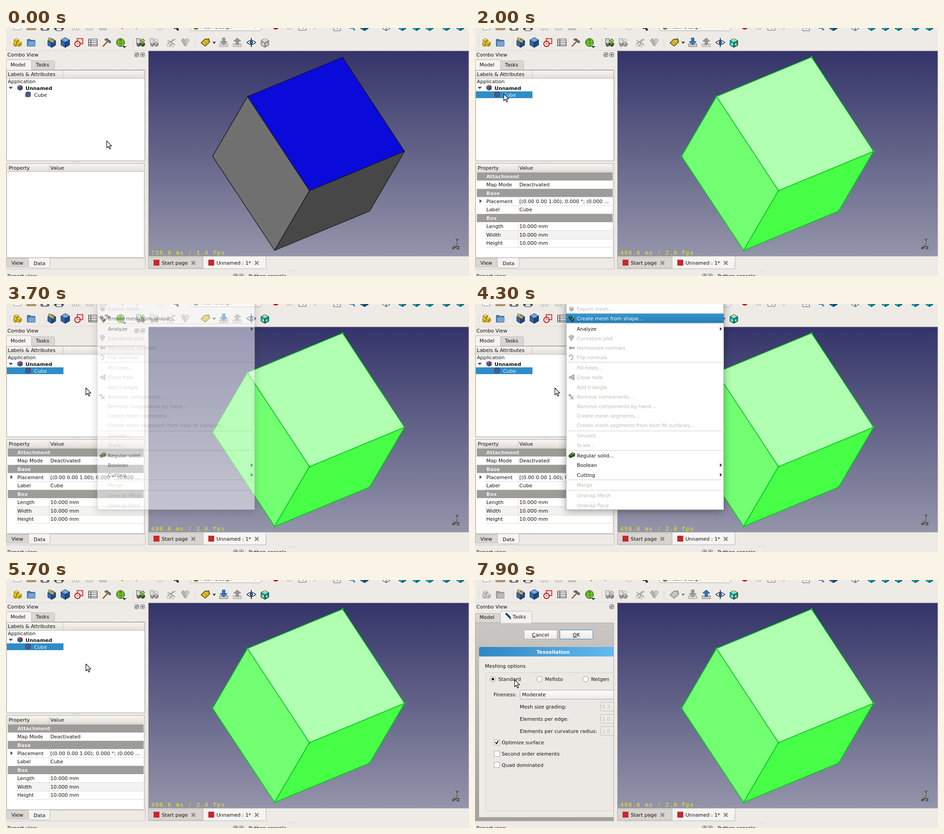
These frames come from a looping animation (1023 px wide and 548 px high, 8 s). An HTML page:

```html
<!DOCTYPE html>
<html lang="en">
<head>
<meta charset="utf-8">
<title>Meshing a cube</title>
<style>
html, body { margin: 0; width: 100%; height: 100%; overflow: hidden; background: #eeebe7; }
svg { display: block; width: 100%; height: 100%; }
text { font: 11px "DejaVu Sans", sans-serif; fill: #111; white-space: pre; }
.b { font-weight: bold; }
.w { fill: #fff; }
.dis { fill: #bdbab7; }
.u { text-decoration: underline; }
.fps { font: 12px "Liberation Mono", monospace; letter-spacing: 1.88px; fill: #f2f200; }
.off { filter: grayscale(1) opacity(.65); }
</style>
</head>
<body>
<svg id="stage" viewBox="0 0 1023 548" preserveAspectRatio="none"></svg>
<script>
const stage = document.getElementById('stage');

// Drawing helpers
const text = (x, y, s, cls = '') => `<text x="${x}" y="${y}" class="${cls}">${s}</text>`;
const rect = (x, y, w, h, fill, stroke = 'none', r = 0) =>
  `<rect x="${x}" y="${y}" width="${w}" height="${h}" rx="${r}" fill="${fill}" stroke="${stroke}"/>`;
const path = (d, fill = 'none', stroke = 'none', w = 1) =>
  `<path d="${d}" fill="${fill}" stroke="${stroke}" stroke-width="${w}" stroke-linejoin="round"/>`;
const disc = (x, y, r, fill, stroke = 'none') =>
  `<circle cx="${x}" cy="${y}" r="${r}" fill="${fill}" stroke="${stroke}"/>`;
const group = (id, body, attrs = '') => `<g id="${id}" ${attrs}>${body}</g>`;
const at = (x, y, body) => `<g transform="translate(${x} ${y})">${body}</g>`;
const gradient = (id, from, to, dir = 'x2="0" y2="1"') =>
  `<linearGradient id="${id}" ${dir}><stop stop-color="${from}"/><stop offset="1" stop-color="${to}"/></linearGradient>`;
const cube = (x, y, r, top, left, right, line = '#222') => {
  const a = r * .87, h = r / 2;
  return at(x, y,
    path(`M0 ${-r}L${a} ${-h}L0 0L${-a} ${-h}Z`, top, line) +
    path(`M${-a} ${-h}L0 0V${r}L${-a} ${h}Z`, left, line) +
    path(`M${a} ${-h}L0 0V${r}L${a} ${h}Z`, right, line));
};
const dots = (x, y, dx, dy, n) => Array.from({ length: n }, (_, i) =>
  rect(x + dx * i, y + dy * i, 1, 1, '#aaa6a2')).join('');
const cross = (x, y, r, c, w) => path(`M${x - r} ${y - r}l${2 * r} ${2 * r}m0 ${-2 * r}l${-2 * r} ${2 * r}`, 'none', c, w);
const floatBtn = (x, y) => rect(x - 4.5, y - 4.5, 9, 9, '#f4f2f0', '#555', 2) +
  rect(x - 2.5, y - .5, 3, 3, 'none', '#444') + path(`M${x - 1} ${y - 2.5}h3.5v3.5`, 'none', '#444');
const closeBtn = (x, y) => rect(x - 4.5, y - 4.5, 9, 9, '#f4f2f0', '#555', 2) + cross(x, y, 2, '#333', 1.4);

const green = ['#8bd83a', '#4f9c14', '#2f700b'];
const gray = ['#ddd', '#aaa', '#888'];
const blue = ['#7aa7dc', '#2f68ac', '#1d4a85'];
const teal = ['#5ee0e6', '#17b3bd', '#0b8791'];
const yellow = ['#ffe65c', '#e5c218', '#c29d0a', '#94780a'];

function topRow() {
  const sheet = (x, h) => rect(x - 8, -9, 16, h, '#fafafa', '#888');
  const views = [840, 876, 907, 936, 973, 1004].map((x, i) =>
    cube(x, -3, 9, ...(i ? teal : ['#eee', '#eee', '#ddd']), '#073f48')).join('');
  return sheet(25, 13) +
    rect(46, -8, 20, 12, '#b99a6b', '#7d6540', 1) +
    rect(77, -8, 18, 13, '#777', '#333', 2) + rect(82, 0, 8, 4, '#eee') +
    rect(107, -6, 20, 10, '#555', '#222', 2) + rect(111, 0, 12, 6, '#eee', '#333') +
    disc(149, 2, 3, 'none', '#999') + disc(158, 2, 3, 'none', '#999') +
    rect(178, -8, 13, 12, '#ddd', '#aaa') + rect(207, -8, 15, 12, '#ccc', '#999') +
    path('M253 -2l4 5 5-6', '#e3c52c', '#b5951c') + path('M283 -4l5 7 4-6', '#ccc', '#aaa') +
    disc(340, -3, 8, '#e4e1de', '#bbb') +
    path('M370 -6l2 8 3-2 4 6 3-2-4-6 4-1z', '#335', '#111') +
    rect(407.5, -12, 157, 18, '#f8f6f4', '#aaa6a2', 3) +
    disc(420, -3, 6, '#4f9c14', '#214f08') + text(429, 1, 'Mesh Design') + path('M547 -3h8l-4 4z', '#333') +
    disc(596, -4, 7, '#d92318', '#8f1109') + rect(621, -7, 10, 10, '#ddd', '#c5c2bf') +
    rect(647, -8, 16, 13, '#f8f8f8', '#555') + path('M655 2l7-9', 'none', '#d87c18', 2) +
    path('M681 -8v12l8-7z', '#ddd', '#bbb') +
    rect(724, -8, 15, 14, '#e8eef4', '#555') + path('M728 -3l4 5 4-5', '#3375b7') +
    disc(762, -5, 6, '#bfe6ef', '#236') + path('M765 -1l6 6', 'none', '#287fae', 3) +
    cube(792, -4, 10, '#e44', '#17a', '#058', '#123') + views;
}

function toolRow() {
  const icon = (id, x, body) => group(id, at(x, 32, body));
  const sheets = (c) => rect(-9.5, -8.5, 8, 10, '#f4f4f4', '#444') + path('M-8 -5.5h5m-5 3h5', 'none', '#888') +
    path('M0 -6h4v-3l5 5-5 5v-3h-4z', c[0], c[2]) + cube(-5, 5, 4, ...gray) + cube(4, 4, 5, ...c);
  const tray = (d) => path('M-9 3v6h18v-6h-4v2h-10v-2z', '#ddd', '#555') + path(d, '#2d78c4', '#16406e');
  return dots(8, 25, 0, 3, 6) + dots(84, 25, 0, 3, 6) + dots(280, 25, 0, 3, 6) + dots(417, 25, 0, 3, 6) +
    icon('part', 25, cube(-2, -3, 6, ...yellow) + cube(-4, 4, 5, ...yellow) + cube(4, 3, 6, ...yellow)) +
    icon('folder', 56, path('M-9 -7h6l2 2h9v13h-17z', '#4678ad', '#2e547d') + rect(-7.5, -3, 16, 11, '#79a6d6', '#4573a5', 1)) +
    at(101, 32, cube(0, 1, 10, ...blue, '#0e2a50') + path('M-8 -8l10 9 3 1-1-4-9-9z', '#f0c52a', '#4a3907')) +
    at(131, 32, cube(0, 0, 11, ...blue, '#0e2a50')) +
    at(161, 32, rect(-4, -9, 13, 12, 'none', '#c81414') + rect(-3, -8, 11, 10, 'none', '#c81414') +
      `<circle cx="-3" cy="3" r="6" fill="#eeebe7" fill-opacity=".5" stroke="#c81414" stroke-width="2"/>`) +
    at(192, 32, rect(-9.5, -7.5, 19, 15, '#fff', '#222') + path('M-9 -3.5h18m-18 4h18m-18 4h18M-4.5 -7v15', 'none', '#222')) +
    at(222, 32, path('M-8 9L4 -4', 'none', '#9c6a2c', 3) + path('M-4 -7l5-2 8 6v4l-4-1-3-4-5-1z', '#777', '#333')) +
    at(253, 32, disc(0, 0, 9, '#4f9c14', '#214f08') + path('M-8 -3q8 4 16 0M-8 3q8 4 16 0M-3 -8q-3 8 0 16M4 -8q3 8 0 16', 'none', '#a5e35a') +
      path('M4 8h9l-4.5 4z', '#222')) +
    icon('import', 298, sheets(green)) +
    at(328, 32, `<g class="off">${sheets(gray)}</g>`) +
    at(365, 32, `<g class="off">${path('M-8 2l17-9M-8 -5l17 10M-2 9l6-17', 'none', '#777', 2)}${disc(-6, 6, 3, 'none', '#777')}${disc(3, 7, 3, 'none', '#777')}</g>`) +
    at(396, 32, `<g class="off">${path('M-9 -5l6-4 2 4v13z', '#999', '#555')}${path('M9 -5l-6-4-2 4v13z', '#bbb', '#555')}</g>`) +
    icon('tag', 440, path('M-9 1l8-8 9-1 2 7-10 9z', '#eac61c', '#3f3404', 1.5) + path('M-4 1l5-4m-2 7l5-4', 'none', '#6c5806') + disc(6, -4, 1.8, '#fff', '#6c5806')) +
    group('tagArrow', path('M456 30.5h8l-4 4.5z', '#333')) +
    icon('load', 481, tray('M-3 -10h6v8h5l-8 7-8-7h5z')) +
    icon('store', 511, tray('M-3 4h6v-7h5l-8-7-8 7h5z')) +
    at(542, 32, path('M-10 0q10-9 20 0q-10 9-20 0z', '#fff', '#16325c', 1.5) + path('M0 -10l2 10-2 10-2-10z', '#2478bd', '#16325c') + disc(0, 0, 3, '#2478bd', '#111')) +
    icon('box', 572, cube(0, 1, 10, ...teal, '#06434a') + disc(-4, 4, 2.2, '#e9e33a') + disc(4, 4, 2.2, '#e9e33a') + disc(0, -6, 2.5, '#e9e33a'));
}

function solid() {
  const P = { a: [743, 64], b: [880, 272], c: [670, 359], d: [533, 151], e: [456, 283], f: [593, 491], g: [803, 404] };
  const faces = (cols, line, w) => ['abcd', 'dcfe', 'cbgf'].map((f, i) =>
    path('M' + [...f].map(k => P[k].join(' ')).join('L') + 'Z', cols[i], line, w)).join('');
  const ends = Object.values(P).map(([x, y]) => rect(x - 2, y - 2, 4, 4, '#00cc1c')).join('');
  return at(.5, .5, group('plain', faces(['#0a0adb', '#707070', '#474747'], '#111', 1.3)) +
    group('picked', faces(['#b1ffb1', '#72ff72', '#47ff47'], '#00c41c', 1.5) + ends));
}

function view3d() {
  return rect(314, 50, 709, 455, '#c6c2be') + rect(315, 51, 707, 453, 'url(#sky)') + solid() +
    group('fps', text(321, 501, '', 'fps')) +
    path('M995 483l2-9', 'none', '#152', 1) + path('M994 486l-5 -8 6 6', 'none', '#1a8a2a') + path('M986 487l10-4', 'none', '#b01818', 1.5) +
    path('M994 465l2.5 4v3m0-3l3-4M986 483l6 6m0-6l-6 6M996 483h6l-6 5h6', 'none', '#111') +
    path('M314.5 505v27h260v-27', '#f6f4f2', '#b5b1ad') + rect(314.5, 506, 121, 25, '#d8d4d0', '#b5b1ad') +
    rect(326, 512, 13, 13, '#c8272d') + text(344, 523, 'Start page') + cross(414, 519, 4, '#8b8885', 2.5) +
    rect(447, 512, 13, 13, '#c8272d') + text(465, 523, 'Unnamed : 1*') + cross(554, 519, 4, '#8b8885', 2.5) +
    dots(625, 536, 3, 0, 6) + dots(312, 286, 0, 3, 5) +
    text(3, 552, 'Report view') + floatBtn(507, 548) + closeBtn(520, 548) + text(536, 552, 'Python console');
}

function modelPanel() {
  const row = (y, k, v, alt) => (alt ? rect(22, y - 9, 282, 18, '#f5f3f1') : '') + text(25, y + 4, k) + text(98, y + 4, v) +
    path(`M22 ${y + 9.5}h282M95.5 ${y - 9}v18`, 'none', '#dedad6');
  const head = (y, s) => rect(4, y - 9, 300, 18, '#9e9c99') + text(25, y + 4, s, 'b').replace('<text', '<text style="fill:#eee"');
  const props = head(328, 'Attachment') + row(346, 'Map Mode', 'Deactivated') + head(364.5, 'Base') +
    row(383, 'Placement', '[(0.00 0.00 1.00); 0.000 °; (0.000 ...') + path('M10 378.5l5 4-5 4z', '#444') +
    row(401, 'Label', 'Cube') + head(420, 'Box') + row(438, 'Length', '10.000 mm') +
    row(457, 'Width', '10.000 mm', 1) + row(475, 'Height', '10.000 mm');
  return closeBtn(302, 59) + floatBtn(289, 59) +
    path('M56.5 92.5v-20h48q3 0 3 3v17z', '#dad6d2', '#b8b4b0') + path('M.5 93v-19q0-4 4-4h48q4 0 4 4v18.5h251', '#f6f4f2', '#b8b4b0') +
    text(10, 85, 'Model') + text(66, 85, 'Tasks') +
    rect(1.5, 93.5, 305, 200, '#fff', '#a5a19d') + rect(2, 94, 304, 17, 'url(#head)') + path('M2 111.5h304M126.5 94v17', 'none', '#c5c1bd') +
    text(4, 106, 'Labels &amp; Attributes') + text(4, 122, 'Application') +
    path('M6 130h9l-4.5 5z', '#444') + cube(31, 132, 6, ...blue, '#34507a') + disc(33, 130, 3, '#c8272d') + text(43, 137, 'Unnamed', 'b') +
    group('rowSel', rect(2, 140, 125, 15, '#308cc6')) +
    at(48, 147, path('M-4 -5l5-1 5 1v9l-5 1.5-5-1.5z', '#34649c', '#253b60') + path('M-5 5V-3M-6 4l5 1M1 -4v9', 'none', '#b52d35')) +
    group('cubeName', text(62, 152, 'Cube')) +
    dots(147, 295, 3, 0, 6) +
    rect(1.5, 299.5, 304, 208, '#fff', '#a5a19d') + rect(3, 301, 301, 16, 'url(#head)') + path('M3 317.5h301M95.5 301v16', 'none', '#c5c1bd') +
    text(6, 313, 'Property') + text(98, 313, 'Value') + group('props', props) +
    rect(.5, 509, 49, 19, '#dad6d2', '#b8b4b0', 2) + path('M49.5 508v18q0 4 4 4h40q4 0 4-4v-18', '#f6f4f2', '#b8b4b0') +
    text(12, 523, 'View') + text(61, 524, 'Data') + path('M98 508.5h209.5v24H0', 'none', '#cbc7c3');
}

function taskPanel() {
  const key = (s) => `<tspan class="u">${s[0]}</tspan>${s.slice(1)}`;
  const button = (x, w, tx, s, line) => rect(x + .5, 110.5, w, 20, 'url(#btn)', line, 2) + text(tx, 125, key(s));
  const radio = (x, s) => disc(x, 219, 6, '#fff', '#8e8a86') + text(x + 12, 223, s);
  const spin = (y, s, v) => text(99, y + 4, s) + rect(277.5, y - 9.5, 40, 19, '#eeebe7', '#bbb7b3', 2) + text(281, y + 4, v, 'dis');
  const check = (y, s) => rect(42.5, y - 6, 12, 12, '#fff', '#aaa6a2') + text(59, y + 4, s);
  return rect(0, 50, 309, 483, '#eeebe7') + text(3, 63, 'Combo View') + floatBtn(302, 59) +
    path('M.5 94v-20h52q3 0 3 3v17z', '#dad6d2', '#b8b4b0') +
    rect(.5, 94.5, 306, 438, 'url(#task)', '#b5b1ad') +
    path('M56 96v-23q0-4 4-4h62q4 0 4 4v23z', '#f4f2f0', '#b8b4b0') + rect(56.5, 94, 69, 2, '#e6e3e0') +
    text(10, 86, 'Model') + path('M67 75l8 8 4 4-1-6-8-8z', '#28477d', '#14284d') + text(83, 85, 'Tasks') +
    `<g clip-path="url(#dock)">` +
    button(108, 73, 126, 'Cancel', '#aaa6a2') + button(187, 73, 216, 'OK', '#3c83ad') +
    rect(9, 169, 297, 355, '#eeebe7') + path('M9 169v-18q0-3 3-3h294v21z', 'url(#bar)') + text(136, 163, 'Tessellation', 'b w') +
    text(22, 194, 'Meshing options') + rect(23.5, 204.5, 300, 306, '#ece9e5', '#d6d2ce', 2) +
    radio(39.5, 'Standard') + radio(142.5, 'Mefisto') + radio(244.5, 'Netgen') + `<circle id="mark" cy="219" r="3" fill="#222"/>` +
    text(41, 257, 'Fineness:') + rect(99.5, 243.5, 230, 20, 'url(#btn)', '#aaa6a2', 2) + text(104, 257, 'Moderate') +
    spin(280, 'Mesh size grading:', '0.3') + spin(307, 'Elements per edge:', '1.0') + spin(333.5, 'Elements per curvature radius:', '2.0') +
    check(359, 'Optimize surface') + path('M45 358l2.5 4 4-7', 'none', '#111', 2) +
    check(384, 'Second order elements') + check(408.5, 'Quad dominated') + '</g>';
}

// Rows: centre y, label, flags (x = disabled, s = submenu), shortcut
function menu(id, x, w, h, seps, rows, extra) {
  const body = rows.map(([y, s, flags = '', keys = '']) => {
    const cls = flags.includes('x') ? 'dis' : '';
    return text(x + 24, y + 4, s, cls) + (keys ? text(x + 205, y + 4, keys, cls) : '') +
      (flags.includes('s') ? path(`M${x + w - 9} ${y - 4}l5 4-5 4z`, '#444') : '');
  }).join('');
  const lines = seps.map(y => path(`M${x + 4} ${y + .5}h${w - 8}`, 'none', '#cfccc9')).join('');
  return group(id, `<rect x="${x}" y="-20" width="${w}" height="${h + 23}" opacity=".35" filter="url(#soft)"/>` +
    rect(x + .5, -5.5, w - 1, h + 5, '#fff', '#a9a6a3') + lines + extra + body);
}

function menus() {
  const macro = menu('macro', 154, 267, 171, [42], [
    [10.5, 'Stop macro recording', 'x'], [32, 'Macros ...'], [55, 'Execute macro', 'x', 'Ctrl+F6'],
    [76, 'Debug macro', 'x', 'F6'], [97, 'Stop debugging', 'x', 'Shift+F6'], [118, 'Step over', 'x', 'F10'],
    [139.5, 'Step into', 'x', 'F11'], [160.5, 'Toggle breakpoint', 'x', 'F9']
  ], rect(162.5, 7.5, 7, 7, '#eee', '#bbb') + rect(160.5, 27, 12, 12, '#fff', '#555') + path('M164 36l9-10', 'none', '#df7e1b', 2.5) +
    path('M162.5 50v9l7-4.5z', '#eee', '#bbb') + path('M160 70h5l8 6-8 6h-5z', '#aaa') + rect(159.5, 90.5, 14, 13, '#aaa', '#888'));
  const dim = '#a9a7a5';
  const mesh = menu('mesh', 201, 349, 455, [43, 128, 280, 323, 388, 411], [
    [10.5, 'Export mesh...', 'x'], [55, 'Analyze', 's'], [76, 'Curvature plot', 'x'], [97, 'Harmonize normals', 'x'],
    [118, 'Flip normals', 'x'], [141, 'Fill holes...', 'x'], [162, 'Close hole', 'x'], [183.5, 'Add triangle', 'x'],
    [204.5, 'Remove components...', 'x'], [226, 'Remove components by hand...', 'x'], [247, 'Create mesh segments...', 'x'],
    [268, 'Create mesh segments from best-fit surfaces...', 'x'], [291, 'Smooth...', 'x'], [312, 'Scale...', 'x'],
    [335, 'Regular solid...'], [356, 'Boolean', 's'], [377.5, 'Cutting', 's'], [400, 'Merge', 'x'],
    [423, 'Unwrap Mesh', 'x'], [444.5, 'Unwrap Face', 'x']
  ], group('hot', rect(201, 21, 349, 21, 'url(#hotBar)')) + group('hotName', text(225, 36, 'Create mesh from shape...')) +
    cube(211, 30, 4, ...blue) + cube(215, 35, 4, ...green) + cube(213, 11, 5, '#eee', '#ccc', '#bbb', '#999') +
    path('M207 72l4-3h4l4 3-6 10z', '#bbb', dim) + path('M207 97l5-5v3h8v4h-8v3z', dim) +
    path('M209 113q8-1 7 5t-5 5m-2-10v4', 'none', dim, 2) + path('M207 162l12-6v12z', '#bbb', '#888') +
    rect(207, 199, 5, 5, dim) + cross(214, 207, 3.5, dim, 2) + cube(211, 336, 4, ...green) + cube(216, 333, 5, ...green));
  return macro + mesh;
}

stage.innerHTML = '<defs>' + gradient('sky', '#343469', '#9494aa') + gradient('head', '#f6f4f2', '#e2deda') +
  gradient('task', '#c9c6c3', '#a3a09d') + gradient('btn', '#fff', '#ebe8e5') + gradient('hotBar', '#3a95cc', '#257fb8') +
  gradient('bar', '#2f87c2', '#62baee', 'x2="1" y2="0"') +
  '<filter id="soft" x="-20%" y="-30%" width="140%" height="160%"><feGaussianBlur stdDeviation="9"/></filter>' +
  '<clipPath id="dock"><path d="M0 95h306v440H0z"/></clipPath></defs>' +
  rect(0, 0, 1023, 548, '#eeebe7') + topRow() + toolRow() + text(3, 63, 'Combo View') +
  path('M0 49.5h1023M308.5 92v440', 'none', '#dcd8d4') + view3d() +
  group('model', modelPanel()) + group('task-panel', taskPanel()) + menus() +
  group('cursor', path('M.5 .5v15.5l3.7-3.5 2.6 6 2.4-1.1-2.6-5.7h5z', '#fff', '#111', 1.2));

const el = id => document.getElementById(id);
const show = (id, on) => el(id).style.display = on ? '' : 'none';
const enable = (id, on) => el(id).setAttribute('class', on ? '' : 'off');
const ease = k => k * k * (3 - 2 * k);

// A menu appears half faded, then solid
function popUp(id, t, from, to) {
  show(id, t >= from && t < to);
  el(id).style.opacity = t < from + 100 ? .5 : 1;
}

// Pointer moves: start, step count, destination
const moves = [[1000, 8, 63, 145], [2200, 3, 176, 185], [7000, 5, 87, 219], [7900, 1, 87, 220]];

function pointer(t) {
  let x = 222, y = 249;
  for (const [start, steps, tx, ty] of moves) {
    if (t < start) break;
    const k = ease(Math.min(1, (Math.floor((t - start) / 100) + 1) / steps));
    x += (tx - x) * k;
    y += (ty - y) * k;
  }
  return [x, y];
}

function draw(t) {
  const rowOn = t >= 1900, picked = t >= 2000, task = t >= 6000;
  const hot = t >= 4300 && t < 5700 && !(t >= 4700 && t < 4900);
  show('rowSel', rowOn);
  el('cubeName').firstChild.style.fill = rowOn ? '#e6f1f8' : '#111';
  show('props', picked);
  show('plain', !picked);
  show('picked', picked);
  el('fps').firstChild.textContent = picked ? '490.6 ms / 2.0 fps' : '736.8 ms / 1.4 fps';
  show('model', !task);
  show('task-panel', task);
  for (const id of ['part', 'folder', 'import', 'tag', 'tagArrow']) enable(id, !task);
  enable('load', rowOn && !task);
  enable('store', task);
  enable('box', rowOn);
  popUp('macro', t, 3000, 3700);
  popUp('mesh', t, 3700, 5700);
  show('hot', hot);
  el('hotName').firstChild.style.fill = hot ? '#fff' : '#111';
  el('mark').setAttribute('cx', t < 7500 ? 244.5 : 39.5);
  const [x, y] = pointer(t);
  el('cursor').setAttribute('transform', `translate(${Math.round(x)} ${Math.round(y)})`);
}

function tick(now) {
  draw(now % 8000);
  requestAnimationFrame(tick);
}
draw(0);
requestAnimationFrame(tick);
</script>
</body>
</html>
```
